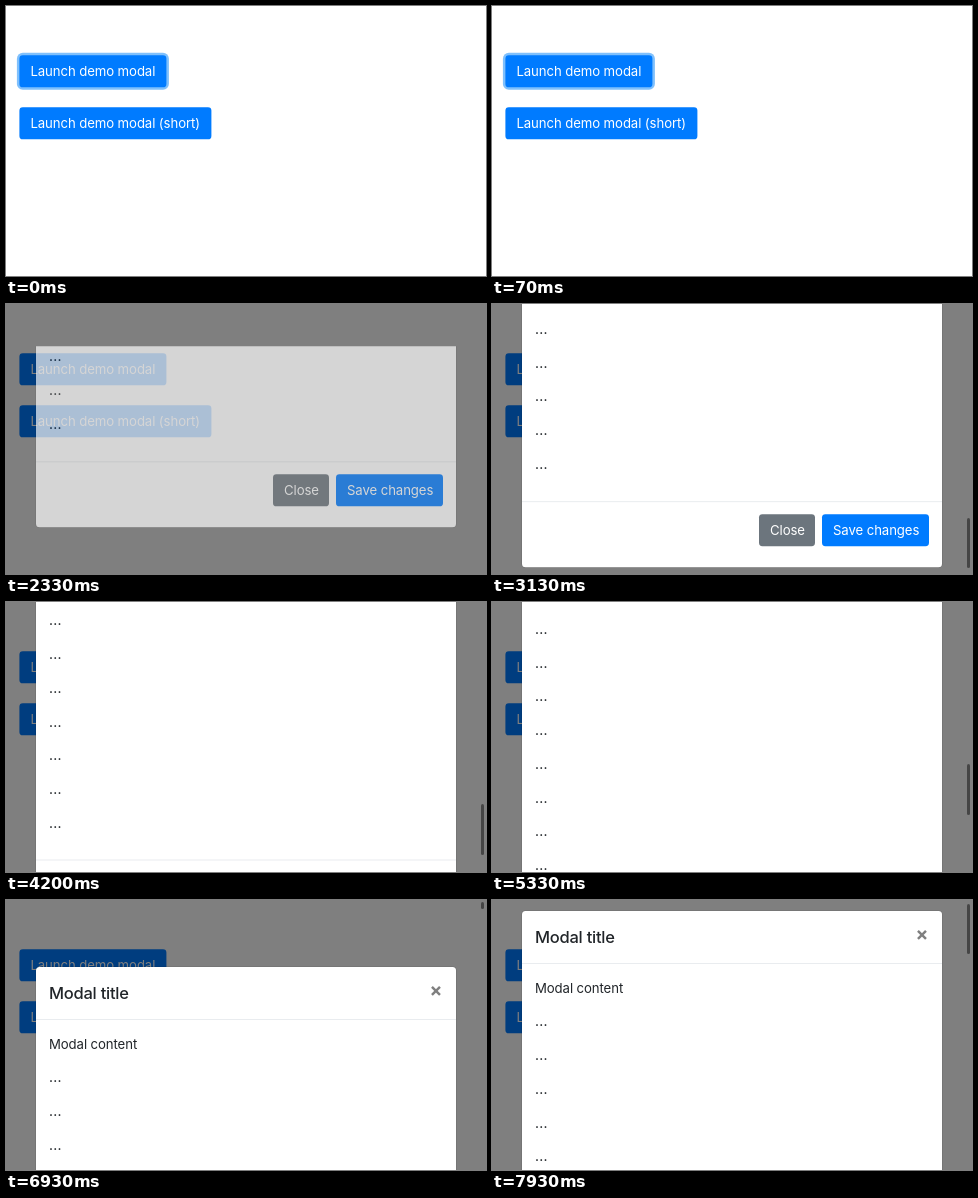
Write an HTML page that moves like this. It is 480 px wide and 270 px high and loops after 8000 ms.

```html
<!DOCTYPE html>
<html lang="en">
<head>
<meta charset="utf-8">
<title>Modal demo</title>
<style>
html, body { margin: 0; width: 100%; height: 100%; overflow: hidden; background: #fff; }
#stage { position: relative; width: 480px; height: 270px; overflow: hidden; color: #212529;
  font: 13.2px/20px Inter, "Liberation Sans", sans-serif; letter-spacing: -.1px; }
#stage div { position: absolute; box-sizing: border-box; white-space: nowrap; }
#page { inset: 0; transform: translate(.4px, .3px); }
#stage .btn { height: 32px; line-height: 33px; padding-left: 11px; border-radius: 3.4px;
  background: #007bff; color: #fff; }
#stage .close-btn { background: #6c757d; }
#backdrop { inset: 0; background: #000; }
#modal { left: 30px; top: 0; width: 420px; border-radius: 3.5px; background: #fff;
  box-shadow: 0 0 0 .8px rgba(0,0,0,.1); }
#modal .title { left: 13px; top: 14px; font-size: 16.5px; line-height: 25px; font-weight: 500;
  letter-spacing: -.25px; }
#modal .x { left: 390px; top: 12px; width: 20px; text-align: center; font-size: 19px;
  line-height: 24px; font-weight: 700; color: #7f7f7f; letter-spacing: 0; }
#modal .rule { left: 0; right: 0; height: 1px; background: #e9ecef; }
#modal .row { left: 13px; }
#modal .dots { font-weight: 500; letter-spacing: .2px; }
#bar { left: 475px; width: 2.5px; border-radius: 1.5px; background: rgba(0,0,0,.45); }
</style>
</head>
<body>
<div id="stage">
  <div id="page">
    <div class="btn" id="launch" style="left:13px;top:49px;width:147px">Launch demo modal</div>
    <div class="btn" style="left:13px;top:101px;width:192px">Launch demo modal (short)</div>
  </div>
  <div id="backdrop"></div>
  <div id="modal">
    <div class="title">Modal title</div>
    <div class="x">×</div>
    <div class="rule" style="top:52px"></div>
  </div>
  <div id="bar"></div>
</div>
<script>
const LOOP = 8000, STEP = 200 / 3;
const ROWS = 35, PITCH = 33.75, FIRST = 77, MARGIN = 23.5;
const FOOT = FIRST + PITCH * ROWS + 37, HEIGHT = FOOT + 65.7;
const MAX = HEIGHT + 2 * MARGIN - 270;

// [ms, value]
const DROP = [[2230, -42], [2333, -23.3], [2400, -8], [2467, 0]];
const SCROLL = [[2800, MAX], [3300, 1110], [4200, 1061], [5333, 850], [5900, 330],
  [6350, 8], [6933, -43.5], [7400, -18], [7933, 12.5]];

const $ = id => document.getElementById(id);
const clamp = (v, lo = 0, hi = 1) => Math.min(hi, Math.max(lo, v));
const ramp = (t, start, length) => clamp((t - start) / length);

// Smooth curve through the points without overshoot
function curve(points, t) {
  const last = points.length - 1;
  if (t <= points[0][0]) return points[0][1];
  if (t >= points[last][0]) return points[last][1];
  const slope = i => (points[i + 1][1] - points[i][1]) / (points[i + 1][0] - points[i][0]);
  const tangent = i => {
    if (i === 0) return 0;
    if (i === last) return slope(i - 1);
    const a = slope(i - 1), b = slope(i);
    return a * b > 0 ? 2 * a * b / (a + b) : 0;
  };
  const i = points.findIndex(p => p[0] > t) - 1;
  const [t0, a] = points[i], [t1, b] = points[i + 1];
  const d = t1 - t0, u = (t - t0) / d, v = 1 - u;
  return a * (1 + 2 * u) * v * v + b * u * u * (3 - 2 * u)
    + d * u * v * (tangent(i) * v - tangent(i + 1) * u);
}

function add(cls, text, style) {
  const el = document.createElement('div');
  el.className = cls;
  el.textContent = text;
  el.style.cssText = style;
  $('modal').append(el);
}

$('modal').style.height = HEIGHT + 'px';
add('row', 'Modal content', `top:${FIRST - 10}px`);
for (let k = 1; k <= ROWS; k++)
  add('row dots', '...', `top:${FIRST + PITCH * k - 10.3}px`);
add('rule', '', `top:${FOOT - .3}px`);
add('btn close-btn', 'Close', `left:237px;top:${FOOT + 13.2}px;width:56px`);
add('btn', 'Save changes', `left:300px;top:${FOOT + 13.2}px;width:107px`);

function draw(t) {
  const ring = 1 - ramp(t, 2000, 80);
  $('launch').style.boxShadow = `0 0 0 ${2.5 * ring}px rgba(0,130,250,${.5 * ring})`;
  $('backdrop').style.opacity = .5 * ramp(t, 2023, 150);

  const scroll = curve(SCROLL, t);
  const top = MARGIN - scroll + curve(DROP, t);
  const modal = $('modal').style;
  modal.opacity = ramp(t, 2233, 150);
  modal.transform = `translateY(${top}px)`;
  // The upper part is painted late while the dialog drops in
  modal.clipPath = t < 2390 ? `inset(${HEIGHT - 181}px -1px -1px)` : 'none';

  const bar = $('bar').style;
  const over = Math.max(0, -scroll, scroll - MAX);
  bar.opacity = ramp(t, 2800, 130);
  bar.top = 1.6 + .189 * clamp(scroll, 0, MAX) + 'px';
  bar.height = Math.max(6, 50.5 - over) + 'px';
}

const begin = performance.now();
function tick() {
  const t = (performance.now() - begin) % LOOP;
  draw(Math.floor((t + 4) / STEP) * STEP);
  requestAnimationFrame(tick);
}
draw(0);
tick();
</script>
</body>
</html>
```
